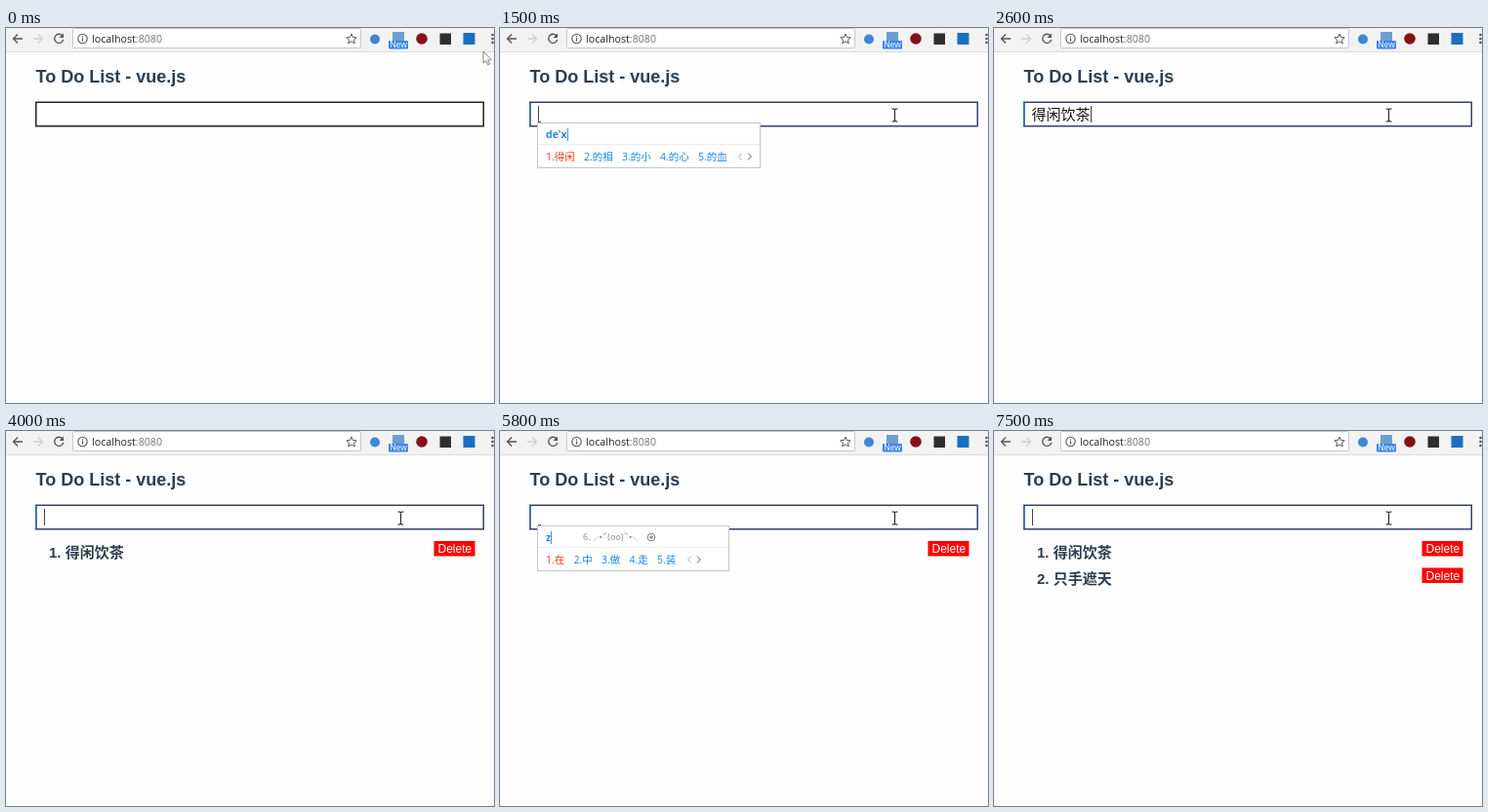
An HTML page for the animation above (8000 ms loop, 500x385 px).

```html
<!DOCTYPE html>
<html lang="zh-CN">
<head>
<meta charset="utf-8">
<title>To Do List</title>
<style>
html, body { margin: 0; width: 100%; height: 100%; overflow: hidden; background: #fefefe; }
svg { display: block; }
#stage { position: absolute; left: 0; top: 0; }
text { white-space: pre; }
.h { font: bold 18px "Liberation Sans", Arial, sans-serif; fill: #2c3e50; }
.li { font: bold 15px "Liberation Sans", "Noto Sans CJK SC", "Noto Sans CJK", sans-serif; fill: #2c3e50; }
.btn { font: 12px "Liberation Sans", Arial, sans-serif; fill: #fff; }
.url { font: 10.7px "Open Sans", "Noto Sans", sans-serif; fill: #222; }
.field { font: 15px "Liberation Sans", "Noto Sans CJK SC", "Noto Sans CJK", sans-serif; fill: #111; }
.badge { font: 8.5px "Open Sans", "Noto Sans", sans-serif; fill: #fff; }
#ime { position: absolute; left: 38px; top: 97px; height: 47px; box-sizing: border-box; padding-left: 8px;
  border: 1px solid #c3c6d2; background: #fff; white-space: nowrap; color: #1d86e6;
  font: 10.5px/22px "Open Sans", "Noto Sans CJK SC", "Noto Sans CJK", sans-serif; }
#top { height: 22px; display: flex; align-items: center; }
#typed { font-weight: bold; color: #2b82ee; }
#bar { width: 1px; height: 13px; background: #4a90e8; }
#face { position: absolute; left: 46px; font-size: 9px; color: #888; }
#plus { position: absolute; left: 111px; top: 6px; }
#row { display: flex; gap: 9.2px; height: 24px; line-height: 24px; }
#row::before { content: ""; position: absolute; left: 0; right: 0; top: 21px; height: 1px; background: #ececf0; }
#row span:first-child { color: #fb3a1e; }
#row svg { flex: none; }
#row .cloud { margin: 3px 0 0 -6px; }
</style>
</head>
<body>
<svg id="stage" width="500" height="385" viewBox="0 0 500 385">
  <rect width="500" height="24" fill="#f2f2f2"/>
  <path d="M0 24.5H500" stroke="#dcdcdc"/>
  <rect x="68.5" y="0.5" width="295" height="20" rx="1" fill="#fff" stroke="#c8c8c8"/>
  <g fill="none" stroke="#555" stroke-width="1.3">
    <path d="M17 11H8M12 6.500L7.500 11L12 15.500"/>
    <path d="M28 11H37M33 6.500L37.500 11L33 15.500" stroke="#d0d0d0"/>
    <path d="M57.700 7.700A4.600 4.600 0 1 0 58.800 12"/>
    <path d="M59 5.500V10H54.500Z" fill="#555" stroke="none"/>
    <circle cx="78.500" cy="11" r="4.700" stroke-width="1.100"/>
    <path d="M78.500 10.300V13.700M78.500 8.200V9.400" stroke-width="1.200"/>
    <path d="M354 6L355.500 9.500L359.200 9.800L356.400 12.200L357.300 15.800L354 13.900L350.700 15.800L351.600 12.200L348.800 9.800L352.500 9.500Z" stroke-width="1"/>
  </g>
  <text class="url" x="88" y="15">localhost<tspan fill="#777">:8080</tspan></text>
  <circle cx="378" cy="11.500" r="5" fill="#3f86d8"/>
  <rect x="396" y="4" width="12" height="9" fill="#6d9fce"/>
  <rect x="392" y="13" width="20" height="8.500" rx="1" fill="#3b86ea"/>
  <text class="badge" x="402" y="20.300" text-anchor="middle">New</text>
  <circle cx="426" cy="11" r="5.800" fill="#86101a"/>
  <rect x="444.500" y="5.500" width="11.500" height="11.500" fill="#2e2e2e"/>
  <rect x="468.500" y="5" width="12" height="12" fill="#1c6fc0"/>
  <g fill="#555"><circle cx="498.500" cy="7" r="1.300"/><circle cx="498.500" cy="11" r="1.300"/><circle cx="498.500" cy="15" r="1.300"/></g>

  <text class="h" x="30.500" y="56">To Do List - vue.js</text>
  <rect id="box" x="30.750" y="76.250" width="458.500" height="24.500" fill="#fff" stroke-width="1.500"/>
  <path id="edge" d="M30.750 77V100" stroke="#2a66ae" stroke-width="1.500"/>
  <text class="field" id="value" x="38.500" y="94"></text>
  <path id="caret" stroke="#444"/>
  <path id="foot" d="M39 96.500H42" stroke="#555"/>
  <g id="list"></g>
</svg>

<div id="ime">
  <div id="top"><span id="typed"></span><i id="bar"></i>
    <span id="face">6.╭•ˊ(oo)ˋ•╮</span>
    <svg id="plus" width="10" height="10" fill="none" stroke="#777"><circle cx="5" cy="5" r="3.800"/><path d="M3 5H7M5 3V7"/></svg>
  </div>
  <div id="row"></div>
</div>

<svg id="mouse" width="500" height="385" style="position:absolute;left:0;top:0">
  <path id="arrow" d="M0 0V12L2.800 9.500L4.700 13.800L6.500 13L4.700 8.900H8.500Z" fill="#fff" stroke="#777" stroke-width="0.900"/>
  <path id="beam" d="M-3 -6.500H-1L0 -5.500L1 -6.500H3M-3 6.500H-1L0 5.500L1 6.500H3M0 -5.500V5.500" fill="none" stroke="#222" stroke-width="1.100"/>
</svg>

<script>
const $ = id => document.getElementById(id);
const LOOP = 8000, FOCUS = 600;

// time, typed letters, candidates (* adds a cloud), minimum width
const typing = [
  [1000, "d", "的 都 到 大 等"],
  [1300, "de", "的 得 德 地 嘚"],
  [1500, "de'x", "得闲 的相 的小 的心 的血"],
  [1600, "de'xi", "得闲 的系 的洗 的西 的戏"],
  [1700, "de'xia", "得闲 的下 的夏 的吓 的侠"],
  [1800, "de'xian", "得闲 的先生 得先有 的现象 的先"],
  [2000, "de'xian'y", "的闲鱼 得先有* 的相(xiang)遇 的嫌疑 的响应"],
  [2300, "de'xian'y'c", "得闲饮茶 的现役车 得闲饮 的先有 得闲"],
  [2600, ""],
  [5300, "z", "在 中 做 走 装", 197],
  [5900, "z's", "真是 只是 这是 知识 咱", 197],
  [6300, "z's'z", "这是在 只是在 正式在 真实在 直视着"],
  [6600, "z's'z't", "只手遮天 这首遮天 直视着他 只是在 这是在"],
  [7000, ""]
];
const items = [[3000, "得闲饮茶"], [7500, "只手遮天"]];
const values = [[0, ""], [2600, "得闲饮茶"], [3000, ""], [7000, "只手遮天"], [7500, ""]];
const blinks = [600, 1000, 1100, 3500, 4000, 4500, 5000, 5800, 5900];
const path = [[489, 24], [480, 28], [455, 36], [428, 48], [411, 60], [405, 82], [404.5, 89.5]];

const latest = (list, t) => list.filter(s => s[0] <= t).pop();
const show = (id, on) => { $(id).style.visibility = on ? "visible" : "hidden"; };

const cloud = '<svg class="cloud" width="8" height="8" fill="none" stroke="#5a9be0"><path d="M2 5.500A1.500 1.500 0 0 1 2 2.500A2 2 0 0 1 6 2.500A1.500 1.500 0 0 1 6 5.500"/></svg>';
const arrows = '<svg width="24" height="24" fill="none"><path d="M6 8.500L2.500 12L6 15.500" stroke="#aaa"/><path d="M12 8.500L15.500 12L12 15.500" stroke="#666"/></svg>';

function candidates(words) {
  return words.split(" ").map((w, i) =>
    `<span>${i + 1}.${w.replace("*", "")}</span>` + (w.endsWith("*") ? cloud : "")).join("") + arrows;
}

function row([, name], i) {
  const y = 27.5 * i;
  return `<text class="li" x="44" y="${129.5 + y}">${i + 1}. ${name}</text>
    <rect x="438.5" y="${113 + y}" width="42" height="15.500" fill="#f00"/>
    <text class="btn" x="442.500" y="${125 + y}">Delete</text>`;
}

let shown, count;
function draw(t) {
  const step = path[Math.min(6, Math.floor(t / 100))];
  const overField = step[1] > 76;
  $("arrow").setAttribute("transform", `translate(${step})`);
  $("beam").setAttribute("transform", `translate(${step})`);
  show("arrow", !overField);
  show("beam", overField);

  const focused = t >= FOCUS;
  $("box").setAttribute("stroke", focused ? "#36406a" : "#222");
  show("edge", focused);

  const value = latest(values, t)[1];
  const end = 39.5 + value.length * 15;
  $("value").textContent = value;
  $("caret").setAttribute("d", `M${end} 80V97`);
  show("caret", blinks.filter(b => b <= t).length % 2);

  const state = latest(typing, t);
  const open = !!(state && state[1]);
  $("ime").style.display = open ? "block" : "none";
  show("foot", open);
  if (open && state !== shown) {
    $("typed").textContent = state[1];
    $("row").innerHTML = candidates(state[2]);
    $("ime").style.minWidth = (state[3] || 0) + "px";
    shown = state;
  }
  const face = open && state[1] === "z" && t >= 5400;
  show("face", face);
  show("plus", face);

  const done = items.filter(s => s[0] <= t);
  if (done.length !== count) {
    $("list").innerHTML = done.map(row).join("");
    count = done.length;
  }
}

const start = performance.now();
function tick() {
  draw((performance.now() - start) % LOOP);
  requestAnimationFrame(tick);
}
tick();
</script>
</body>
</html>
```
